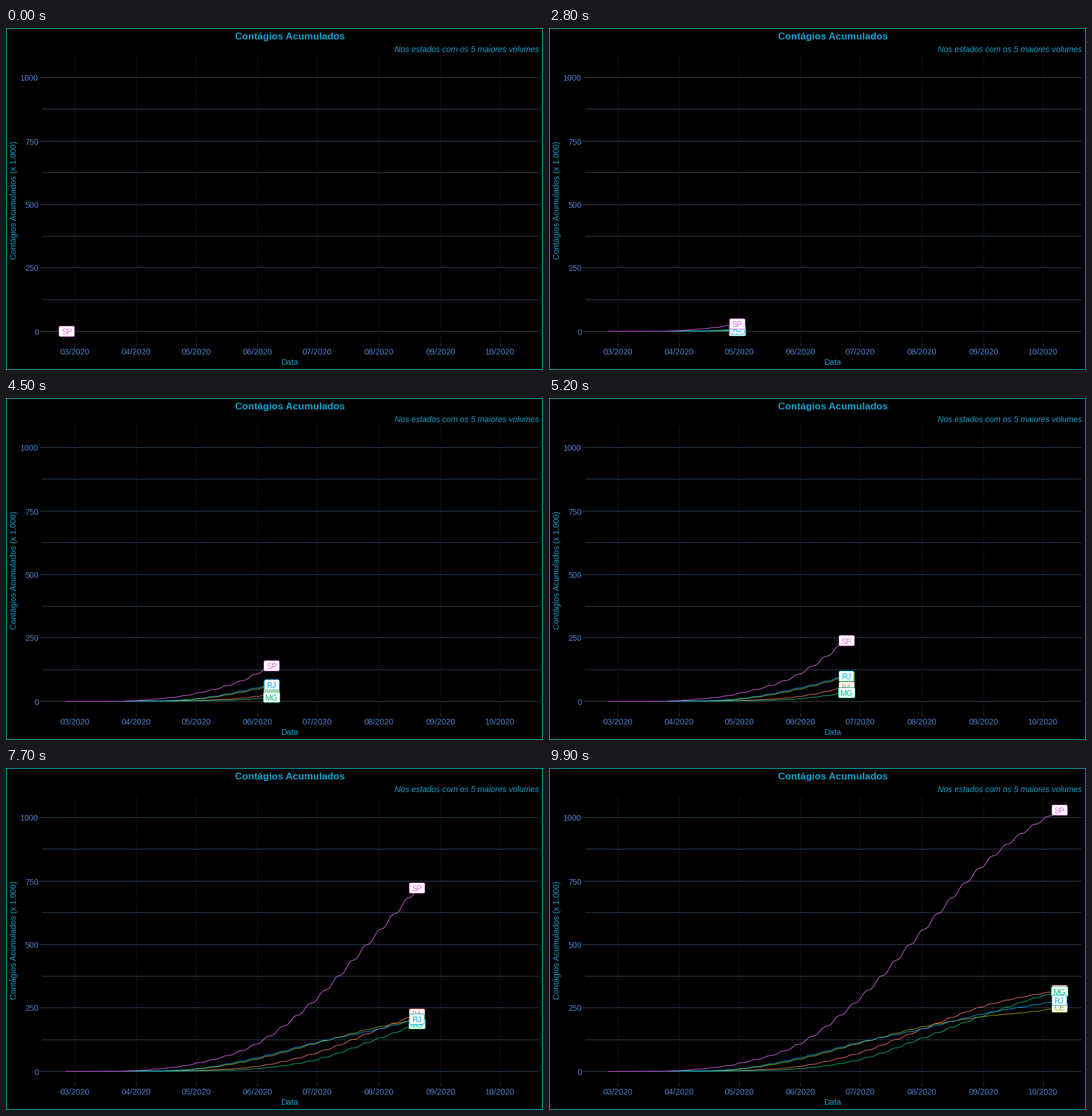
Recreate the animation shown at these times as a matplotlib script. Size 938 by 597 pixels, loop 10000 ms.

```python
import numpy as np
import matplotlib.pyplot as plt
from matplotlib.animation import FuncAnimation
from matplotlib.patches import FancyBboxPatch

W, H, DPI = 938, 597, 64
FRAMES, INTERVAL = 100, 100
PT = 72 / DPI
LEFT, RIGHT, TOP, BOTTOM = 63, 931, 49, 551
BOX_H = 18

TITLE, TICK = "#10a0cb", "#4a80c8"
GRID, BORDER = "#33475a", "#00e5ee"

# Days are counted from 25 February
MONTHS = np.cumsum([5, 31, 30, 31, 30, 31, 31, 30])
LAST_DAY = 228
KEY_DAYS = np.array([0, *MONTHS[1:], LAST_DAY])

# Colour, first day, label width, thousands of cases on the key days
STATES = {
    "BA": ("#F8766D", 10, 27, [0, .3, 3.2, 20, 74, 166, 257, 308, 319]),
    "CE": ("#A3A500", 20, 27, [0, .5, 8, 49, 112, 175, 216, 241, 254]),
    "MG": ("#00BF7D", 12, 29, [0, .3, 2, 11, 47, 130, 220, 298, 315]),
    "RJ": ("#00B0F6", 9, 26, [0, .8, 10, 54, 115, 167, 227, 268, 281]),
    "SP": ("#E76BF3", 0, 27, [0, 3, 31, 111, 290, 552, 815, 993, 1030]),
}

plt.rcParams["font.family"] = "Liberation Sans"


def px(day):
    return 103 + 3.474 * day


def py(cases):
    return 529.5 - 0.443 * cases


def pixel(v):
    return np.floor(v) + 0.5


def smooth(t, xs, ys):
    """Cubic Hermite curve through the key points."""
    ys = np.asarray(ys, float)
    slope = np.gradient(ys, xs)
    i = np.clip(np.searchsorted(xs, t, "right") - 1, 0, len(xs) - 2)
    h = xs[i + 1] - xs[i]
    u = (t - xs[i]) / h
    rise = u * u * (3 - 2 * u)
    bend = u * (1 - u) * ((1 - u) * slope[i] - u * slope[i + 1])
    return ys[i] + (ys[i + 1] - ys[i]) * rise + h * bend


def daily(keys):
    """Totals per day; reporting nearly stops on Sundays and Mondays."""
    day = np.arange(LAST_DAY + 1)
    t = day + 0.9 * np.sin(2 * np.pi * (day - 1.5) / 7)
    cases = smooth(np.clip(t, 0, LAST_DAY), KEY_DAYS, keys)
    return np.maximum.accumulate(np.maximum(cases, 0))


fig = plt.figure(figsize=(W / DPI, H / DPI), dpi=DPI, facecolor="black")
ax = fig.add_axes([0, 0, 1, 1])
ax.set(xlim=(0, W), ylim=(H, 0))
ax.axis("off")


def rule(xs, ys, color, **kw):
    return ax.plot(xs, ys, color=color, lw=PT, snap=False,
                   solid_capstyle="butt", dash_capstyle="butt", **kw)[0]


def write(x, y, s, color, size=14.2, ha="center", **kw):
    return ax.text(x, y, s, color=color, fontsize=size * PT, ha=ha,
                   va="baseline", rotation_mode="anchor", **kw)


def draw_chart():
    rule([.5, W - .5, W - .5, .5, .5], [.5, .5, H - .5, H - .5, .5], BORDER,
         solid_joinstyle="miter")
    for month, day in enumerate(MONTHS, 3):
        x = pixel(px(day) - 0.2)
        rule([x, x], [BOTTOM, TOP], GRID, linestyle=(0, (1, 3)))
        rule([x, x], [BOTTOM, BOTTOM + 4], GRID)
        write(x - 0.5, 570.3, f"{month:02d}/2020", TICK)
    for cases in range(0, 1001, 125):
        y = pixel(py(cases))
        major = cases % 250 == 0
        rule([LEFT - 4 * major, RIGHT], [y, y], GRID)
        if major:
            write(57, y + 6, str(cases), TICK, ha="right")
    write(496.5, 20.3, "Contágios Acumulados", TITLE, 17.2, weight="bold")
    write(931, 42, "Nos estados com os 5 maiores volumes", TITLE, 14.25,
          ha="right", style="italic")
    write(496.5, 588, "Data", TITLE)
    write(18.5, 301, "Contágios Acumulados (x 1.000)", TITLE, rotation=90)


class Series:
    def __init__(self, name, z):
        color, self.start, self.width, keys = STATES[name]
        self.cases = daily(keys)
        self.line = rule([], [], color, zorder=10 + z)
        self.box = ax.add_patch(FancyBboxPatch(
            (0, 0), self.width, BOX_H, zorder=20 + 2 * z, fc="white",
            boxstyle="round,pad=0,rounding_size=2.5", ec=color, lw=PT))
        self.text = write(0, 0, name, color, 13.6, zorder=21 + 2 * z)

    def show(self, day):
        shown = day >= self.start
        for part in (self.line, self.box, self.text):
            part.set_visible(shown)
        if not shown:
            return
        days = np.arange(self.start, day + 1)
        self.line.set_data(px(days), py(self.cases[days]))
        x, y = px(day), py(self.cases[day])
        self.box.set_bounds(pixel(x - self.width / 2), pixel(y - BOX_H / 2),
                            self.width, BOX_H)
        self.text.set_position((x, y + 5.8))


draw_chart()
series = [Series(name, z) for z, name in enumerate(STATES)]


def update(i):
    day = int(round(1.2 + 2.28 * i))
    for s in series:
        s.show(day)
    return []


anim = FuncAnimation(fig, update, frames=FRAMES, interval=INTERVAL,
                     repeat=True, repeat_delay=0, blit=False)
plt.show()
```
